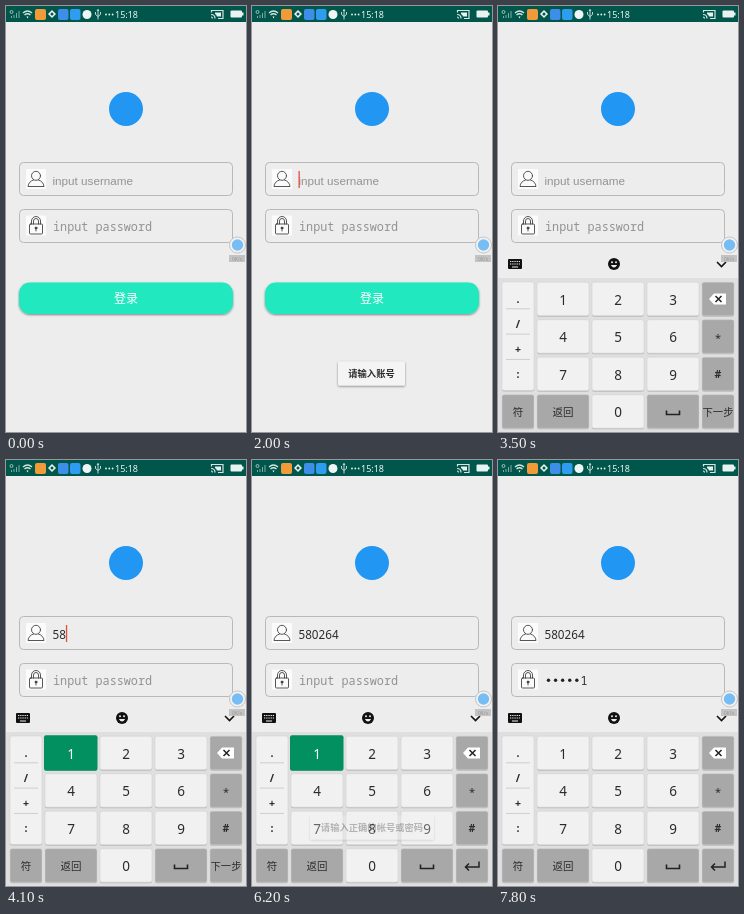
Animation, 240 px wide and 426 px high, one loop 8 s. Source, as an HTML page:

```html
<!DOCTYPE html>
<html lang="zh">
<head>
<meta charset="utf-8">
<title>Login</title>
<style>
html, body { margin: 0; width: 100%; height: 100%; overflow: hidden; background: #ededed; }
svg { display: block; width: 100%; height: 100%; }
text { font-family: "Noto Sans", "Noto Sans CJK SC", "Noto Sans CJK", sans-serif; fill: #2b2b2b; }
.mono { font-family: "Noto Sans Mono", monospace; }
.mid { text-anchor: middle; }
.hint { fill: #929292; }
#user.hint { font-family: "Liberation Sans", sans-serif; }
.line { fill: none; stroke: #444; stroke-width: .9; stroke-linecap: round; stroke-linejoin: round; }
</style>
</head>
<body>
<svg id="stage" viewBox="0 0 240 426">
  <defs>
    <filter id="shade" x="-10%" y="-30%" width="120%" height="170%">
      <feDropShadow dx="0" dy="1" stdDeviation="1" flood-opacity=".45"/>
    </filter>
  </defs>
  <rect width="240" height="426" fill="#ededed"/>

  <g id="status">
    <rect width="240" height="16" fill="#00564a"/>
    <g fill="none" stroke="#d5e5e2">
      <path d="M5.500 12v-2M8 12V9M10.500 12V7M13 12V5" stroke-width="1" opacity=".6"/>
      <circle cx="5.500" cy="6" r="1.500" stroke-width=".7"/>
      <path d="M17 7q4.500-4 9 0M18.500 9q3-2.500 6 0" stroke-width="1.300"/>
      <path d="M92 3.500v10M89.500 6v2.500l2.500 2 2.500-2V6M91 5l1-1.500 1 1.500" stroke-width=".9"/>
      <path d="M205.500 6.500v-2h11.500v8h-5M205 8.500q4 0 4 4M205 11q1.500 0 1.500 1.500" stroke-width="1.200"/>
    </g>
    <path d="M20.500 10.500h2l-1 2z" fill="#fff"/>
    <rect x="29" y="3" width="11" height="11" rx="2" fill="#f29a38"/>
    <path d="M46 4l4 4-4 4-4-4z" fill="#e8f2f0"/>
    <circle cx="46" cy="8" r="1.500" fill="#00564a"/>
    <rect x="52" y="3" width="10.500" height="11" rx="2" fill="#3d8ee8"/>
    <rect x="64" y="3" width="10.500" height="11" rx="2" fill="#2e9df0"/>
    <circle cx="81" cy="8.500" r="4.500" fill="#eef5f4"/>
    <g fill="#e8f2f0">
      <circle cx="100" cy="8.500" r=".9"/><circle cx="103.300" cy="8.500" r=".9"/><circle cx="106.600" cy="8.500" r=".9"/>
      <path d="M209 6.500h6v4h-4q-.5-2-2-2.500z"/>
      <rect x="224.500" y="4.500" width="11.500" height="7" rx="1"/><rect x="236" y="6.500" width="1.500" height="3"/>
    </g>
    <text x="109" y="12.300" font-size="9" style="fill:#f0f6f5">15:18</text>
  </g>

  <circle cx="120" cy="103" r="17" fill="#2196f3"/>

  <g fill="none" stroke="#b8b8b8">
    <rect x="13.500" y="156.500" width="213" height="33" rx="4"/>
    <rect x="13.500" y="203.500" width="213" height="33" rx="4"/>
  </g>
  <rect x="20" y="163" width="20" height="20" fill="#fbfbfb"/>
  <rect x="20" y="209.500" width="20" height="20" fill="#fbfbfb"/>
  <g class="line">
    <circle cx="30" cy="169.800" r="4.500"/>
    <path d="M27.500 174q-5 1.500-5.500 6.500h16q-.5-5-5.500-6.500"/>
    <rect x="23.500" y="218" width="13" height="10" rx="1"/>
    <path d="M25.500 218v-3a4.500 4.500 0 0 1 9 0v3M27.500 218v-3a2.500 2.500 0 0 1 5 0v3M30 222.500v2.500"/>
    <circle cx="30" cy="222" r="1" fill="#222"/>
  </g>
  <text id="user" x="46.500" y="178.700" font-size="11.700"></text>
  <text id="pass" class="mono" x="47" y="224.500" font-size="11.800"></text>
  <g id="dots" fill="#222"></g>
  <rect id="caret" width="1.300" height="17" fill="#e0523c"/>

  <rect x="13" y="276.500" width="214" height="31.500" rx="11" fill="#20e8c0" filter="url(#shade)"/>
  <text class="mid" x="120" y="297.300" font-size="12" style="fill:#fff">登录</text>

  <g id="board"></g>
  <g id="toast"></g>

  <g id="float">
    <rect x="223" y="249" width="16" height="7" fill="#bdbdbd" opacity=".85"/>
    <text class="mid" x="231" y="254.800" font-size="5" style="fill:#999">0K/s</text>
    <circle cx="231.500" cy="239" r="8" fill="#f3f3f3" stroke="#c3c3c3"/>
    <circle cx="231.500" cy="239" r="5.700" fill="#78bcf4"/>
  </g>
</svg>
<script>
const LOOP = 8000, USER = '580264';
const $ = id => document.getElementById(id);
const userTaps = [3900, 4050, 4200, 4400, 4580, 4780];
const passTaps = [6300, 6600, 6850, 7100, 7300, 7500];
const clamp = v => Math.max(0, Math.min(1, v));
const ramp = (t, from, to) => clamp((t - from) / (to - from));
const within = (t, spans) => spans.some(([a, b]) => t >= a && t < b);
const count = (t, taps) => taps.filter(tap => t >= tap).length;

const label = (x, y, s, size, weight = 400) =>
  `<text class="mid" x="${x}" y="${y}" font-size="${size}" font-weight="${weight}">${s}</text>`;

const cap = (x, y, w, h, fill) =>
  `<rect x="${x}" y="${y + 1}" width="${w}" height="${h}" rx="2" fill="#b9b9b9"/>
   <rect x="${x}" y="${y}" width="${w}" height="${h}" rx="2" fill="${fill}" stroke="#cccccc" stroke-width=".5"/>`;

function buildBoard() {
  const light = '#f1f1f1', dark = '#a8a8a8', rowY = r => 276.2 + r * 37.5;
  let s = '<rect y="244" width="240" height="182" fill="#dfdfdf"/><rect y="244" width="240" height="28" fill="#ededed"/>';
  s += '<rect x="10" y="253" width="14" height="10" rx="1" fill="#111"/>' +
    '<path d="M12 255.500h10M12 258h10" stroke="#ededed" stroke-width="1.200" stroke-dasharray="1.300 .9"/>' +
    '<path d="M14 261h6" stroke="#ededed"/>' +
    '<circle cx="116" cy="258" r="6" fill="#111"/><circle cx="114" cy="256.300" r="1" fill="#ededed"/>' +
    '<circle cx="118" cy="256.300" r="1" fill="#ededed"/><path d="M112.800 259h6.400q-3.200 5-6.400 0z" fill="#ededed"/>' +
    '<path d="M219 256l4.500 4.500 4.500-4.500" fill="none" stroke="#111" stroke-width="1.600"/>';
  s += cap(4, 276, 32, 108.500, light);
  ['.', '/', '+', ':'].forEach((c, i) => {
    s += label(20, 296.5 + i * 25.3, c, 10.5, 600);
    if (i) s += `<path d="M8 ${277.5 + i * 25.3}h24" stroke="#cecece"/>`;
  });
  for (let n = 1; n <= 9; n++) {
    const x = 39 + (n - 1) % 3 * 55, y = rowY(Math.floor((n - 1) / 3));
    s += cap(x, y, 52, 33.500, light);
    if (n === 1) s += `<rect id="press" x="${x - 1}" y="${y - 1}" width="53.500" height="35.500" rx="2" fill="#039060"/>`;
    s += `<g id="num${n}">${label(x + 26, y + 22.3, n, 13.5)}</g>`;
  }
  for (let r = 0; r < 4; r++) s += cap(204, rowY(r), 32, 33.500, dark);
  s += '<path d="M211 293l5-5.500h12v11h-12z" fill="#fff"/><path d="M217.500 290l6 6m0-6l-6 6" stroke="#222" stroke-width="1.500"/>';
  s += label(220, 335.500, '*', 11) + label(220, 372.300, '#', 10.500, 600);
  const y = rowY(3);
  s += cap(4, y, 32, 33.500, dark) + label(20, y + 21.500, '符', 10.500, 500);
  s += cap(39, y, 52, 33.500, dark) + label(65, y + 21.500, '返回', 10.500, 500);
  s += cap(94, y, 52, 33.500, light) + label(120, y + 22.300, '0', 13.500);
  s += cap(149, y, 52, 33.500, dark) +
    '<path d="M168.500 404.500v4h13v-4" fill="none" stroke="#222" stroke-width="1.600"/>';
  s += `<g id="next">${label(220, y + 21.500, '下一步', 10.300, 500)}</g>`;
  s += '<path id="enter" d="M227 401.500v5.500h-13.500m3.500-3.500l-3.500 3.500 3.500 3.500" fill="none" stroke="#222" stroke-width="1.500"/>';
  $('board').innerHTML = s;
}

function toast(t) {
  const first = t < 3600;
  const [a, b, x, w, msg] = first
    ? [1500, 3100, 86, 67, '请输入账号']
    : [4350, 5950, 58, 124, '请输入正确的帐号或密码'];
  const alpha = ramp(t, a, a + 200) * (1 - ramp(t, b, b + 360));
  $('toast').setAttribute('opacity', alpha);
  if (toast.msg === msg) return;
  toast.msg = msg;
  $('toast').innerHTML =
    `<rect x="${x}" y="355.500" width="${w}" height="24" rx="1.500" fill="#f4f4f4" filter="url(#shade)"/>` +
    label(x + w / 2, 371, msg, 9.300, 600);
}

function caret(t, typed, secret) {
  const inPass = t >= 5500;
  const on = within(t, [[1800, 2300], [2900, 3400], [3800, 5200], [5500, 5950], [7200, 7700]]);
  const x = inPass ? 46.5 + secret * 7.08 : 46.5 + typed * 6.7;
  $('caret').setAttribute('x', x);
  $('caret').setAttribute('y', inPass ? 211.5 : 165);
  $('caret').setAttribute('opacity', on ? 1 : 0);
}

function field(id, value, hint) {
  $(id).textContent = value || hint;
  $(id).classList.toggle('hint', !value);
}

function draw(t) {
  const typed = count(t, userTaps), secret = count(t, passTaps);
  const hidden = Math.max(0, secret - 1);
  field('user', USER.slice(0, typed), 'input username');
  field('pass', secret ? '1' : '', 'input password');
  $('pass').setAttribute('x', 47 + hidden * 7.08);
  $('dots').innerHTML = Array.from({ length: hidden }, (_, i) =>
    `<circle cx="${50.5 + i * 7.08}" cy="220.300" r="1.700"/>`).join('');
  caret(t, typed, secret);

  const rise = 1 - Math.pow(1 - ramp(t, 2920, 3220), 3);
  $('board').setAttribute('transform', `translate(0 ${182 * (1 - rise)})`);
  const down = [...userTaps, ...passTaps].some(tap => t >= tap - 110 && t < tap);
  $('press').setAttribute('opacity', down ? 1 : 0);
  $('num1').firstChild.style.fill = down ? '#fff' : '#2b2b2b';
  $('next').setAttribute('opacity', t < 5500 ? 1 : 0);
  $('enter').setAttribute('opacity', t < 5500 ? 0 : 1);
  toast(t);
}

buildBoard();
function tick() {
  draw(performance.now() % LOOP);
  requestAnimationFrame(tick);
}
tick();
</script>
</body>
</html>
```
